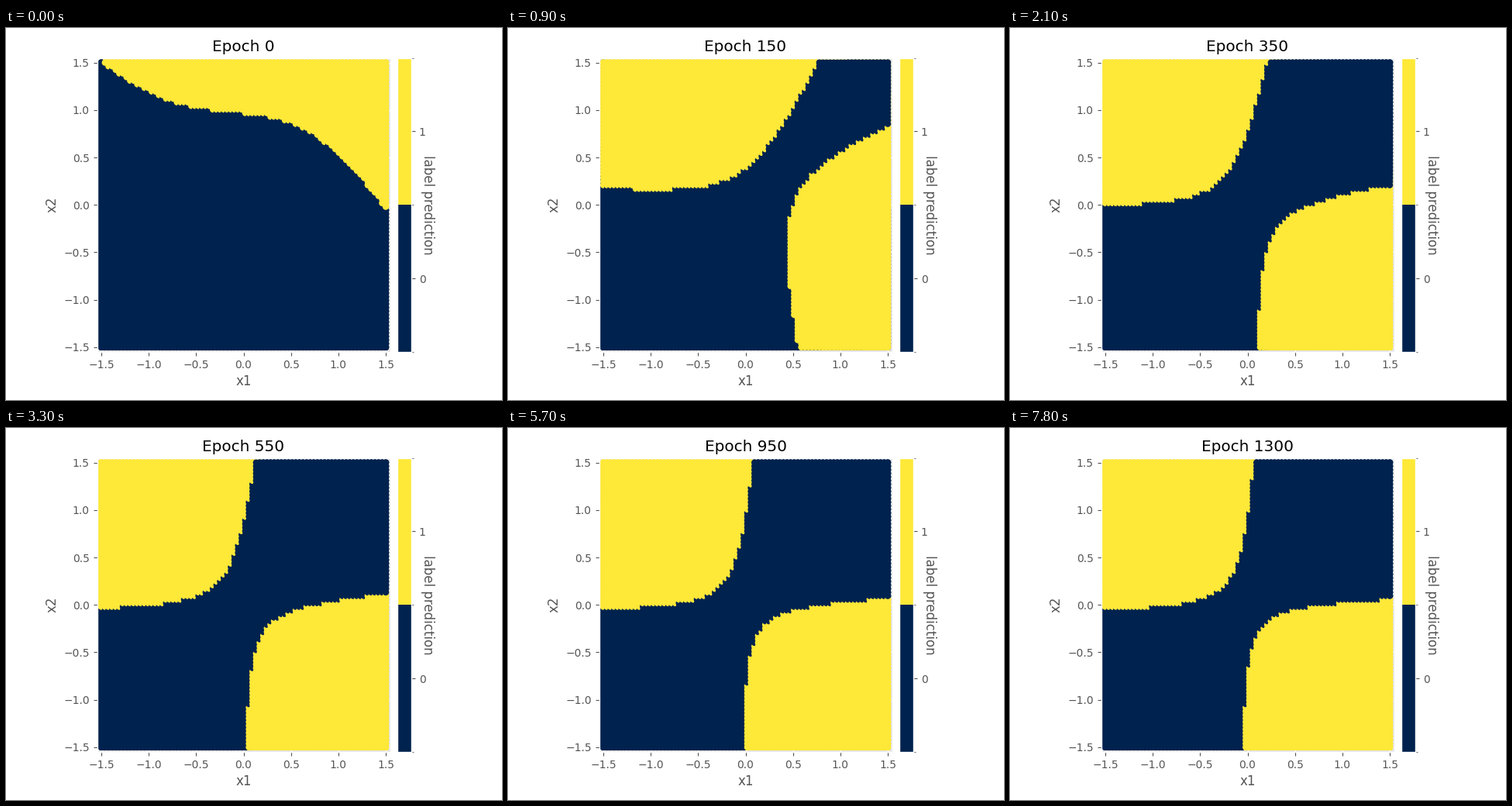
A matplotlib script that plays this animation: 640 px wide and 480 px high, repeating every 8 s.

```python
import numpy as np
import matplotlib.pyplot as plt
from matplotlib.animation import FuncAnimation
from matplotlib.colors import ListedColormap

W, H, DPI = 640, 480, 100
NAVY, YELLOW, GREY = "#00224e", "#fee838", "#555555"
STEP_MS, LOOP_MS, HOLD = 100, 8000, 3
EPOCHS_PER_STEP = 50
DOTS = 80
TOP, BOTTOM = 38.5, 418
OVERLAP = 0.015  # later dots cover earlier ones to the right and above

plt.rcParams.update({
    "font.family": "DejaVu Sans", "font.size": 10,
    "axes.facecolor": "#e5e5e5", "axes.edgecolor": "white", "axes.linewidth": 1,
    "axes.labelcolor": GREY, "axes.labelsize": 12, "axes.titlesize": 14.4,
    "axes.axisbelow": True, "grid.color": "white", "grid.linestyle": "-",
    "xtick.color": GREY, "ytick.color": GREY,
})

# Column by column, so that each column overlaps the one to its left
values = np.linspace(-1.5, 1.5, DOTS)
X, Y = (g.ravel() for g in np.meshgrid(values, values, indexing="ij"))
U, V = X - OVERLAP, Y - OVERLAP
RIM = np.maximum(abs(X), abs(Y)) > 1.499


def inside_hyperbola(a, b, c):
    return (a > 0) & (b > 0) & (a * b > c)


def initial_frontier(x):
    return .953 - .11 * x - .11 * x**2 - .25 * x**3 + .03 * x**5


def bent_frontier(x):
    bend = .141 * np.logaddexp(0, (x - .416) / .141)
    return .38 - .03 * x + .075 * x**2 - 2.4 * bend


def two_regions(epoch):
    """Two hyperbola branches whose asymptotes straighten up with training."""
    w = min(150 / epoch, 1.2)
    upper = inside_hyperbola(
        V - (-.13 + .07 * w - .1 * w**3 * U),
        (.096 - .597 * w + .631 * w**2 + .48 * w * V) - U,
        .093 + .042 * w**2)
    lower = inside_hyperbola(
        (.03 - .04 * w + .36 * w**2 + (.02 + .15 * w + .23 * w**2) * U) - V,
        U - (-.137 + .38 * w - .093 * w**2 - .2 * w**3 * V),
        .05 + .14 * w)
    return upper | lower


def predict(epoch):
    if epoch == 0:
        positive = V > initial_frontier(U)
    elif epoch <= 50:
        positive = V > bent_frontier(U)
    else:
        positive = two_regions(epoch)
    return positive.astype(float)


def place(left, right):
    return fig.add_axes([left / W, 1 - BOTTOM / H,
                         (right - left) / W, (BOTTOM - TOP) / H])


steps = -(-LOOP_MS // (STEP_MS * HOLD))
labels = [predict(EPOCHS_PER_STEP * k) for k in range(steps)]

fig = plt.figure(figsize=(W / DPI, H / DPI), dpi=DPI, facecolor="white")
cmap = ListedColormap([NAVY, YELLOW])

ax = place(117.6, 495.5)
ax.set(xlim=(-1.545, 1.545), ylim=(-1.55, 1.55), xlabel="x1", ylabel="x2")
ticks = np.arange(-1.5, 1.6, 0.5)
ax.set_xticks(ticks)
ax.set_yticks(ticks)
ax.grid(True)
title = ax.set_title("")

dot_style = dict(s=36, linewidths=0, cmap=cmap, vmin=0, vmax=1)
# Earlier epochs stay underneath and tint the soft rim of the dots
history = [ax.scatter(X[RIM], Y[RIM], c=labels[0][RIM], **dot_style)
           for _ in range(4)]
dots = ax.scatter(X, Y, c=labels[0], **dot_style)

bar = place(504.5, 523.2)
bar.imshow([[0], [1]], cmap=cmap, origin="lower", aspect="auto",
           extent=(0, 1, -.5, 1.5), interpolation="nearest")
bar.set_xticks([])
bar.yaxis.tick_right()
bar.set_yticks([0, 1])
bar.set_yticks([-.5, .5, 1.5], minor=True)
fig.text(544.3 / W, 1 - 228.5 / H, "label prediction", rotation=270,
         ha="center", va="center", size=12, color=GREY)


def update(frame):
    step = frame // HOLD
    for age, old in enumerate(reversed(history), 1):
        old.set_array(labels[max(step - age, 0)][RIM])
    dots.set_array(labels[step])
    title.set_text(f"Epoch {EPOCHS_PER_STEP * step}")
    return [*history, dots, title]


anim = FuncAnimation(fig, update, frames=LOOP_MS // STEP_MS,
                     interval=STEP_MS, repeat=True, repeat_delay=0)
plt.show()
```
